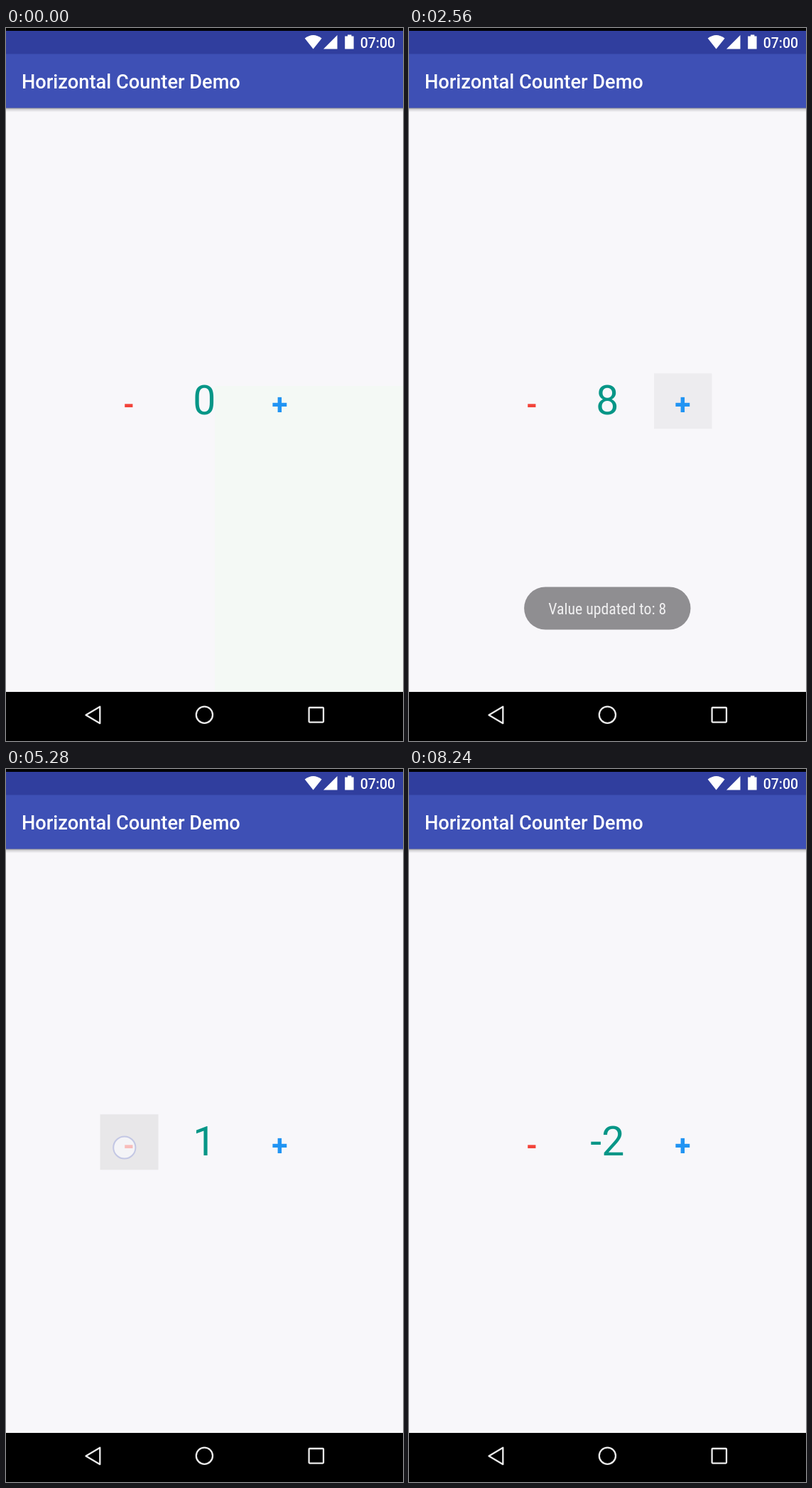
An HTML page that plays this animation: 559 by 1002 pixels, repeating every 8560 ms.

```html
<!DOCTYPE html>
<html lang="en">
<head>
<meta charset="utf-8">
<title>Horizontal Counter Demo</title>
<style>
  html, body { margin: 0; width: 100%; height: 100%; overflow: hidden; background: #000; }
  svg { display: block; width: 100%; height: 100%; }
  text { font-family: Roboto, sans-serif; }
  .mid { text-anchor: middle; }
  .sign { font-size: 40.8px; font-weight: 700; }
  .medium { font-weight: 500; fill: #fff; }
  .nav { fill: none; stroke: #ebebeb; stroke-width: 2.3; stroke-linejoin: round; }
  #message { font-family: "Roboto Condensed", Roboto, sans-serif; font-stretch: condensed; font-size: 22px; fill: #eee; }
</style>
</head>
<body>
<svg viewBox="0 0 559 1002">
  <defs>
    <linearGradient id="shade" x2="0" y2="1">
      <stop offset="0" stop-opacity=".36"/>
      <stop offset=".4" stop-opacity=".13"/>
      <stop offset="1" stop-opacity="0"/>
    </linearGradient>
  </defs>

  <rect width="559" height="1002"/>
  <rect y="112" width="559" height="821" fill="#f8f7fa"/>
  <path id="tint" d="M294 503H559V933H294z" fill="#f4f9f5"/>

  <rect y="4" width="559" height="33" fill="#303e9e"/>
  <rect y="36.5" width="559" height="76" fill="#3e50b5"/>
  <rect y="112.3" width="559" height="6" fill="url(#shade)"/>

  <g fill="#fff">
    <path d="M420.7 14.6Q432.6 5.6 444.6 14.6L432.6 29.4z"/>
    <path d="M466.5 10V29.4H447z"/>
    <path d="M481 9.6h5.4v2h3.2v18h-12.4v-18h3.8z"/>
  </g>
  <text class="medium" x="548" y="27.8" font-size="19.4" text-anchor="end">07:00</text>
  <text class="medium" x="22" y="84.8" font-size="27.2">Horizontal Counter Demo</text>

  <rect id="minusPress" x="132.5" y="485.3" width="82" height="78"/>
  <rect id="plusPress" x="345" y="485.3" width="81.5" height="78"/>
  <text class="mid sign" x="173" y="542.6" fill="#f2433a">-</text>
  <text class="mid sign" x="385.5" y="542.6" fill="#2194f3">+</text>
  <text class="mid" id="count" x="279.3" y="542.6" font-size="57.1" fill="#069687">0</text>
  <circle id="touch" r="15.6" fill="#fbfafd" fill-opacity=".66" stroke="#c3c7e4" stroke-width="2"/>

  <g id="toast">
    <rect id="pill" y="785.5" height="60" rx="30" fill="#646266"/>
    <text class="mid" id="message" x="279.3" y="824"></text>
  </g>

  <g class="nav">
    <path d="M112.5 965.5L132.3 953.8V977.2z"/>
    <circle cx="279.4" cy="965.2" r="11.6"/>
    <rect x="426.6" y="955" width="20.4" height="20.6" rx="1"/>
  </g>
</svg>
<script>
  const LOOP = 8560;
  const FADE = 400, TOAST_STAY = 1845;
  const PRESS_DELAY = 100, PRESS_IN = 600, PRESS_OUT = 480, PRESS_ALPHA = 0.0685;

  // A held button steps once on contact, then repeats until it is released.
  const holds = [
    { press: "plusPress", x: 399.6, y: 540.3, down: 955, up: 2380, repeat: 1485, every: 146, from: 0, step: 1, steps: 8, pill: 234.4 },
    { press: "minusPress", x: 166.8, y: 532, down: 4075, up: 5570, repeat: 4575, every: 122, from: 8, step: -1, steps: 10, pill: 239.4 }
  ];

  const $ = id => document.getElementById(id);
  const clamp = v => Math.max(0, Math.min(1, v));
  const set = (id, attrs) => {
    for (const name in attrs) $(id).setAttribute(name, attrs[name]);
  };

  function countAt(hold, t) {
    if (t < hold.down) return hold.from;
    const repeats = t < hold.repeat ? 0 : Math.floor((t - hold.repeat) / hold.every) + 1;
    return hold.from + hold.step * Math.min(1 + repeats, hold.steps);
  }

  function pressAt(hold, t) {
    const enter = clamp((Math.min(t, hold.up) - hold.down - PRESS_DELAY) / PRESS_IN);
    return PRESS_ALPHA * enter * (1 - clamp((t - hold.up) / PRESS_OUT));
  }

  function toastAt(hold, t) {
    const enter = clamp((t - hold.up) / FADE);
    const leave = clamp((t - hold.up - TOAST_STAY) / FADE);
    return (1 - (1 - enter) ** 2) * (1 - leave ** 2);
  }

  function draw(t) {
    const active = t < holds[1].down ? holds[0] : holds[1];
    $("count").textContent = countAt(active, t);

    const touching = t >= active.down && t < active.up;
    set("touch", { cx: active.x, cy: active.y, opacity: touching ? 1 : 0 });
    for (const hold of holds) set(hold.press, { opacity: pressAt(hold, t) });

    const shown = t < holds[1].up ? holds[0] : holds[1];
    $("message").textContent = "Value updated to: " + (shown.from + shown.step * shown.steps);
    set("pill", { x: 279.3 - shown.pill / 2, width: shown.pill });
    set("toast", { opacity: toastAt(shown, t) });
    set("tint", { opacity: 1 - clamp(t / 560) });
  }

  // Without a condensed face, a smaller size keeps the message inside its pill.
  draw(0);
  const length = $("message").getComputedTextLength();
  $("message").style.fontSize = 22 * Math.min(1, 166 / length) + "px";

  const start = performance.now();
  function tick() {
    draw((performance.now() - start) % LOOP);
    requestAnimationFrame(tick);
  }
  tick();
</script>
</body>
</html>
```
